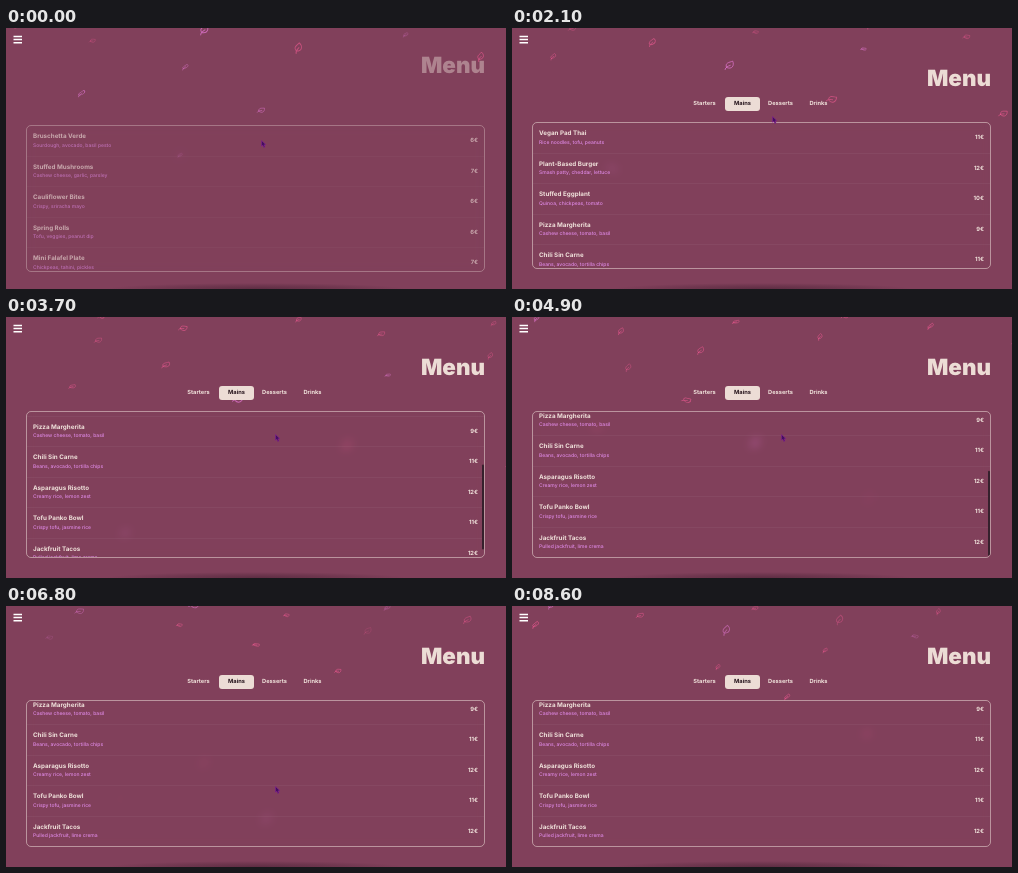
Write an HTML page that moves like this. It is 500x261 px and loops after 8.7 s.

```html
<!DOCTYPE html>
<html lang="en">
<head>
<meta charset="utf-8">
<title>Menu</title>
<style>
  * { box-sizing: border-box; }
  html, body { margin: 0; width: 100%; height: 100%; overflow: hidden; background: #81405b; }
  body { font-family: Inter, "Open Sans", sans-serif; color: #f1e3dc; text-rendering: geometricPrecision; }
  #stage { position: absolute; left: 0; top: 0; width: 500px; height: 261px; overflow: hidden; }
  #stage > * { position: absolute; }
  svg { left: 0; top: 0; width: 500px; height: 261px; }
  #leaves { fill: none; stroke-linecap: round; stroke-linejoin: round; }
  #shade { left: 100px; top: 255px; width: 300px; height: 6px;
    background: radial-gradient(ellipse 50% 100% at 50% 100%, #3a1a2b80, #3a1a2b40 55%, transparent); }
  h1 { margin: 0; right: 21px; top: 36px; font-size: 22.4px; line-height: 30px; font-weight: 900; color: #ecdcd5; }
  .tab { position: absolute; top: 69px; width: 35px; height: 13.5px; border-radius: 3px;
    font-size: 5.7px; line-height: 14.5px; font-weight: 700; text-align: center; }
  #panel { left: 20px; top: 94px; width: 459px; height: 147px; overflow: hidden;
    border: 1px solid #f1e3dc85; border-radius: 5px; backdrop-filter: blur(4px); }
  .list { position: absolute; inset: 0 0 auto; }
  .row { position: relative; height: 30.5px; border-bottom: 1px solid #ffffff0b; white-space: nowrap; }
  .row * { position: absolute; left: 6px; }
  .row b { top: 6.4px; font-size: 6.25px; line-height: 9px; font-weight: 700; }
  .row i { top: 15.5px; font-size: 5px; line-height: 8px; font-style: normal; font-weight: 450; color: #de88e4; }
  .row em { left: auto; right: 6px; top: 10px; font-size: 5.8px; line-height: 9px; font-style: normal; font-weight: 700; }
  #thumb { position: absolute; right: 0; top: 0; width: 2.5px; height: 85px; border-radius: 2px; background: #35202c; }
</style>
</head>
<body>
<div id="stage">
  <svg id="leaves"></svg>
  <div id="shade"></div>
  <h1 id="title">Menu</h1>
  <div id="tabs"></div>
  <div id="panel">
    <div class="list" id="starters"></div>
    <div class="list" id="mains"></div>
    <div id="thumb"></div>
  </div>
  <svg>
    <path d="M7.5 8.4h8.5M7.5 11.6h8.5M7.5 14.8h8.5" stroke="#fff" stroke-width="1.5"/>
    <path id="cursor" d="M-1.5-3.5V2.3L-.1 1.2.8 3.4 2 2.9 1.1.8 2.9.7Z" fill="#43105f" stroke="#8a1f9b" stroke-width=".5"/>
  </svg>
</div>
<script>
const LOOP = 8700, STEP = 100;
const $ = id => document.getElementById(id);
const clamp = v => Math.min(1, Math.max(0, v));
const easeOut = v => 1 - (1 - clamp(v)) ** 3;
const mix = (a, b, k) => a + (b - a) * k;

// Value of keyed stops [time, a, b, ...] at time t, eased inside each span.
function keyed(stops, t) {
  const n = stops.findIndex(s => s[0] > t);
  if (n < 0) return stops.at(-1).slice(1);
  if (n === 0) return stops[0].slice(1);
  const [from, to] = [stops[n - 1], stops[n]];
  const u = (t - from[0]) / (to[0] - from[0]), k = u * u * (3 - 2 * u);
  return from.slice(1).map((v, i) => mix(v, to[i + 1], k));
}

const menus = {
  starters: `Bruschetta Verde|Sourdough, avocado, basil pesto|6
Stuffed Mushrooms|Cashew cheese, garlic, parsley|7
Cauliflower Bites|Crispy, sriracha mayo|6
Spring Rolls|Tofu, veggies, peanut dip|6
Mini Falafel Plate|Chickpeas, tahini, pickles|7`,
  mains: `Vegan Pad Thai|Rice noodles, tofu, peanuts|11
Plant-Based Burger|Smash patty, cheddar, lettuce|12
Stuffed Eggplant|Quinoa, chickpeas, tomato|10
Pizza Margherita|Cashew cheese, tomato, basil|9
Chili Sin Carne|Beans, avocado, tortilla chips|11
Asparagus Risotto|Creamy rice, lemon zest|12
Tofu Panko Bowl|Crispy tofu, jasmine rice|11
Jackfruit Tacos|Pulled jackfruit, lime crema|12`
};
for (const id in menus) {
  $(id).innerHTML = menus[id].split('\n').map(line => {
    const [name, note, price] = line.split('|');
    return `<div class="row"><b>${name}</b><i>${note}</i><em>${price}€</em></div>`;
  }).join('');
}

const tabs = ['Starters', 'Mains', 'Desserts', 'Drinks'].map((name, i) => {
  const tab = document.createElement('div');
  tab.className = 'tab';
  tab.textContent = name;
  tab.style.left = 175 + 38 * i + 'px';
  $('tabs').append(tab);
  return tab;
});
function lightTab(tab, k) {
  tab.style.background = `rgba(236,220,213,${k})`;
  tab.style.color = `rgb(${mix(241, 38, k)},${mix(227, 20, k)},${mix(220, 28, k)})`;
}

let seed = 11;
const random = () => (seed = seed * 16807 % 2147483647) / 2147483647;

// Leaves are born ever more often; most fade near the top, a few fall all the way.
const COUNT = 42;
const leaves = Array.from({ length: COUNT }, (_, i) => {
  const el = document.createElementNS('http://www.w3.org/2000/svg', 'path');
  el.setAttribute('d', 'M-4.5 4.5C-4 1.5-1.5 1 1 0M-3 2.2C-5-3 0-3 3.6-4.5 5.5 0 3 5-3 2.2');
  el.setAttribute('stroke', random() < .55 ? '#ee5a92' : '#dd74cc');
  $('leaves').append(el);
  return {
    el,
    born: mix(-8, 8.6, (i / COUNT) ** .7),
    x: (i * .618 % 1) * 500 - 20,
    life: 2.8 + 6.5 * random() ** 2,
    drift: 8 + 12 * random(),
    size: .55 + .4 * random(),
    tilt: .45 + .55 * random(),
    alpha: .4 + .5 * random(),
    phase: random() * 6.3
  };
});

function drawLeaf(leaf, t) {
  const age = Math.max(0, t - leaf.born);
  const x = leaf.x + leaf.drift * age, y = 3 * age * age + 4 * age - 6;
  const turn = 28 * Math.sin(t * 1.3 + leaf.phase);
  leaf.el.setAttribute('transform',
    `translate(${x} ${y}) rotate(${turn}) scale(${leaf.size} ${leaf.size * leaf.tilt})`);
  leaf.el.setAttribute('opacity', leaf.alpha * clamp(leaf.life - age));
}

const cursorPath = [[0, 257, 116], [.9, 234, 77], [2.1, 262, 92], [2.8, 271, 121],
  [5.7, 271, 121], [6.8, 271, 184], [7.7, 274, 268]];
const scrollPath = [[2.4, 0], [3.7, 87], [4.8, 98]];

function draw(t) {
  for (const leaf of leaves) drawLeaf(leaf, t);

  const drop = easeOut((t + .08) / .6);
  $('title').style.opacity = mix(.12, 1, drop);
  $('title').style.transform = `translateY(${-20 * (1 - drop)}px)`;
  $('tabs').style.opacity = clamp((t - .1) / .4);
  const rise = easeOut(t / .4);
  $('panel').style.opacity = mix(.65, 1, rise);
  $('panel').style.transform = rise < 1 ? `translateY(${3 * (1 - rise)}px)` : 'none';

  const picked = clamp((t - 1.1) / .2);
  lightTab(tabs[0], 1 - picked);
  lightTab(tabs[1], picked);
  $('starters').style.opacity = 1 - picked;
  $('mains').style.opacity = clamp((t - 1.3) / .3);

  const [scroll] = keyed(scrollPath, t);
  $('mains').style.transform = `translateY(${-scroll}px)`;
  $('thumb').style.transform = `translateY(${2 + scroll * .58}px)`;
  $('thumb').style.opacity = t > 2.4 ? clamp((5.8 - t) / .3) : 0;

  const [x, y] = keyed(cursorPath, t);
  $('cursor').setAttribute('transform', `translate(${x} ${y})`);
}

const began = performance.now();
function tick() {
  const ms = (performance.now() - began) % LOOP;
  draw(Math.floor(ms / STEP) * STEP / 1000);
  requestAnimationFrame(tick);
}
tick();
</script>
</body>
</html>
```
